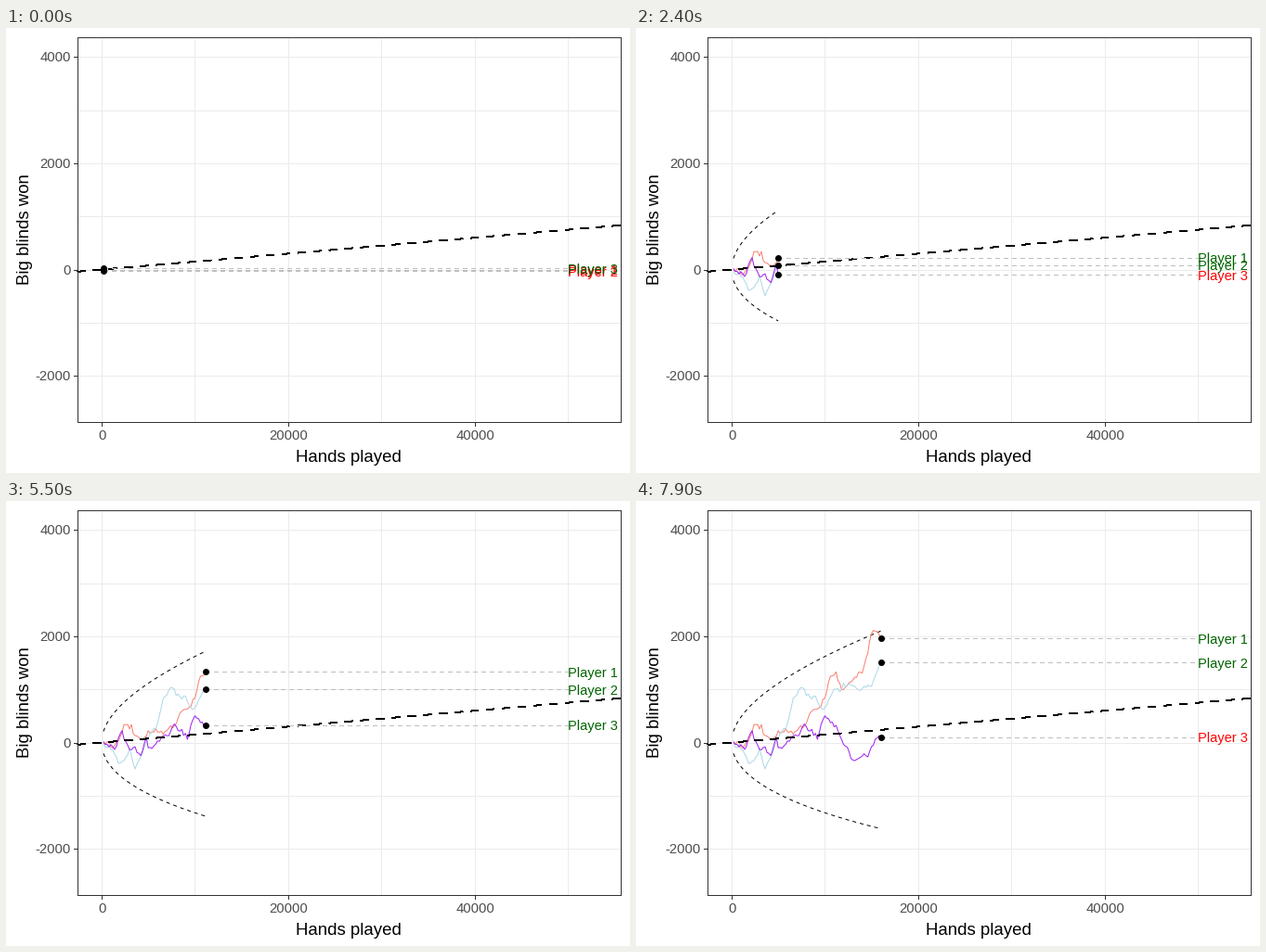
Animation, 672 px wide and 480 px high, one loop 8000 ms. Source, as a matplotlib script:

```python
import matplotlib.pyplot as plt
import numpy as np
from matplotlib.animation import FuncAnimation

W, H, DPI = 672, 480, 96
FRAMES, STEP = 80, 200
EV, SD = 0.015, 7.5  # per hand, in big blinds
LEFT, RIGHT, TOP, BOTTOM = 77, 662, 10, 425
X_SCALE, Y_SCALE = 0.01005, 0.05733
PX = 72 / DPI
DASH = (0, (4, 4))
EDGE, GRID, TICK_TEXT = "#333333", "#ebebeb", "#4d4d4d"

plt.rcParams["font.family"] = "Liberation Sans"

# Main swings of each run: (step, big blinds)
SWINGS_1 = [(1, 0), (6, -105), (12, 340), (16, 340), (18, 130), (22, 50),
            (30, 200), (33, 160), (38, 280), (44, 624), (50, 830),
            (53, 1250), (56, 1330), (59, 990), (64, 1140), (71, 1440),
            (75, 2050), (80, 1960)]
SWINGS_2 = [(1, -30), (9, -390), (15, -110), (18, -495), (24, 20), (30, 365),
            (33, 828), (38, 1030), (44, 878), (49, 620), (56, 1000),
            (60, 1120), (64, 1080), (69, 980), (75, 1060), (80, 1506)]
SWINGS_3 = [(1, 20), (6, -75), (11, 225), (15, -130), (18, -80), (21, -245),
            (24, 100), (27, -110), (33, 130), (39, 350), (44, 135), (46, 60),
            (50, 505), (56, 325), (60, -35), (64, -300), (73, -270),
            (80, 100)]

rng = np.random.default_rng(4)
steps = np.arange(1, FRAMES + 1)
hands = steps * STEP


def px(n):
    return 102.9 + X_SCALE * n


def py(blinds):
    return 260.6 - Y_SCALE * blinds


def random_run(swings, sd=45):
    """Random walk pinned to the main swings."""
    at, level = np.array(swings).T
    walk = rng.normal(0, sd, FRAMES).cumsum()
    return walk + np.interp(steps, at, level - walk[at - 1])


fig = plt.figure(figsize=(W / DPI, H / DPI), dpi=DPI, facecolor="white")
ax = fig.add_axes([0, 0, 1, 1])
ax.set_xlim(0, W)
ax.set_ylim(H, 0)
ax.axis("off")


def line(x, y, color, z=1, crisp=True, ls="-"):
    return ax.plot(x, y, color=color, lw=PX, zorder=z, ls=ls,
                   antialiased=not crisp, solid_capstyle="butt")[0]


def label(x, y, s, size, color="black", ha="center", **kw):
    return ax.text(x, y, s, size=size, color=color, ha=ha, va="baseline", **kw)


def draw_panel():
    for n in range(0, 50001, 10000):
        line([px(n)] * 2, [TOP, BOTTOM], GRID)
    for blinds in range(-2000, 4001, 1000):
        line([LEFT, RIGHT], [py(blinds)] * 2, GRID)
    line([LEFT, RIGHT, RIGHT, LEFT, LEFT],
         [TOP, TOP, BOTTOM, BOTTOM, TOP], EDGE, z=9)
    for n in range(0, 40001, 20000):
        line([px(n)] * 2, [BOTTOM, BOTTOM + 4], EDGE)
        label(px(n) + 0.3, 444.3, str(n), 11.2, TICK_TEXT)
    for blinds in range(-2000, 4001, 2000):
        line([LEFT - 4, LEFT], [py(blinds)] * 2, EDGE)
        label(69.8, py(blinds) + 5, str(blinds), 11.2, TICK_TEXT, "right")
    label(369, 468, "Hands played", 14)
    label(25, 217, "Big blinds won", 14, rotation=90, rotation_mode="anchor")


class Player:
    def __init__(self, name, swings, color):
        self.run = random_run(swings)
        self.path = line([], [], color, z=3, crisp=False)
        self.guide = line([], [], "#bebebe", z=5, ls=DASH)
        self.dot = ax.plot([], [], "o", color="black", ms=7 * PX, mew=0,
                           zorder=6)[0]
        self.name = label(px(50000), 0, name, 11, ha="left", zorder=7)

    def show(self, i):
        x, y = px(hands[i]), py(self.run[i])
        self.path.set_data(px(hands[:i + 1]), py(self.run[:i + 1]))
        self.guide.set_data([x, px(50000)], [y, y])
        self.dot.set_data([x], [y])
        self.name.set_y(y + 5.4)
        ahead = self.run[i] > EV * hands[i]
        self.name.set_color("#006400" if ahead else "#ff0000")


draw_panel()

# An aliased 1 px stroke on this shallow slope fills two rows.
ends = np.array([LEFT, RIGHT])
line(ends, py(EV * (ends - px(0)) / X_SCALE), "black", z=4, ls=(0, (8, 8)))

margin = 1.96 * SD * np.sqrt(hands)
bounds = [(line([], [], "black", z=2, crisp=False, ls=DASH), EV * hands + m)
          for m in (margin, -margin)]
players = [Player("Player 1", SWINGS_1, "#fa8072"),
           Player("Player 2", SWINGS_2, "#add8e6"),
           Player("Player 3", SWINGS_3, "#a020f0")]


def update(i):
    for curve, values in bounds:
        curve.set_data(px(hands[:i + 1]), py(values[:i + 1]))
    for player in players:
        player.show(i)


anim = FuncAnimation(fig, update, frames=FRAMES, interval=100,
                     init_func=lambda: update(0), repeat=True, repeat_delay=0)
plt.show()
```
